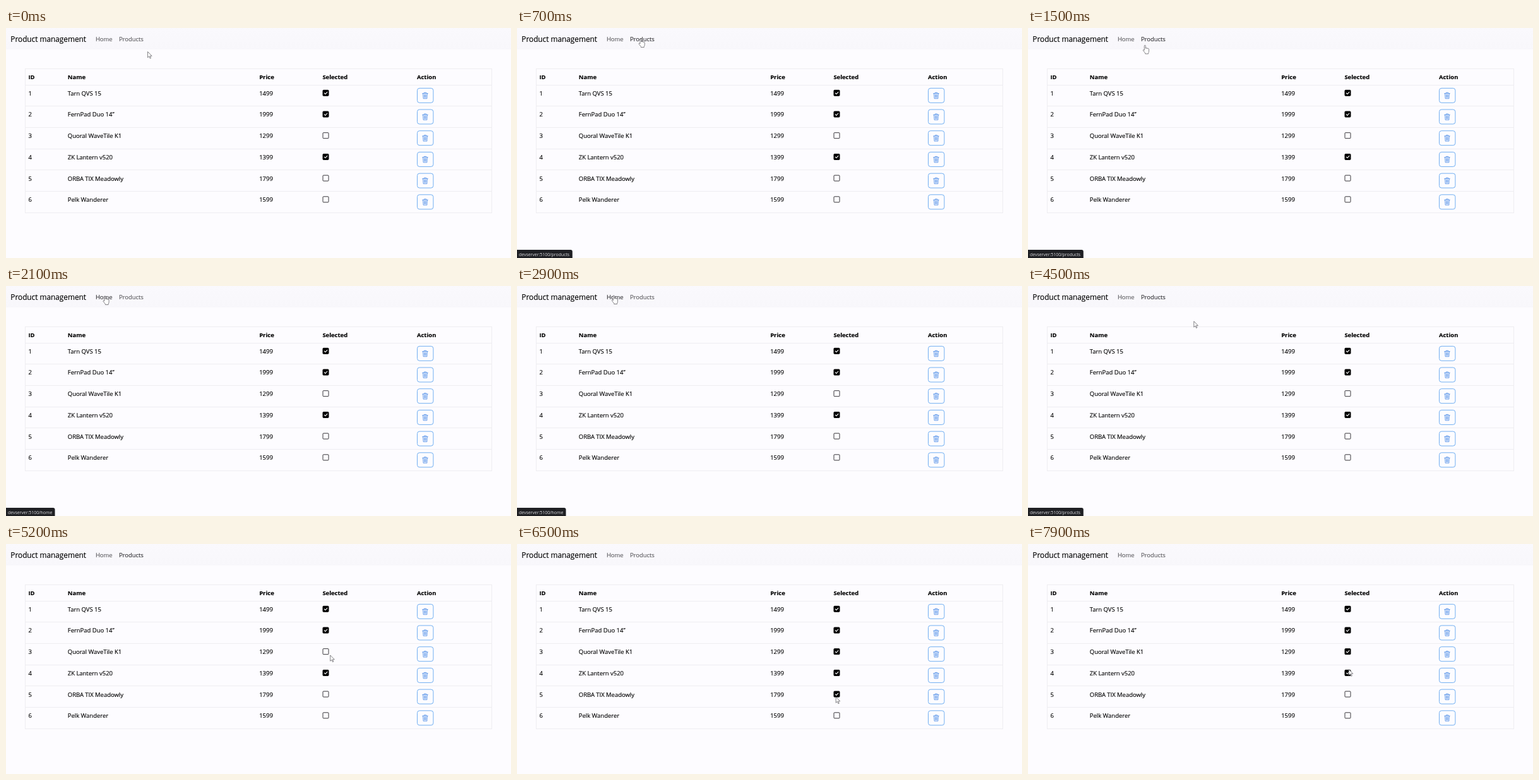
Write an HTML page that moves like this. It is 800 px wide and 364 px high and loops after 8000 ms.

```html
<!DOCTYPE html>
<html lang="en">
<head>
<meta charset="utf-8">
<title>Product management</title>
<style>
  html, body { margin: 0; height: 100%; overflow: hidden; background: #fdfcff; }
  svg { display: block; width: 100vw; height: 100vh; font: 9.45px "Open Sans", "Noto Sans", sans-serif; }
  text { fill: #000; stroke: #000; stroke-width: .15; }
  .brand { font-size: 11.82px; }
  .link { fill: #5f5e62; stroke: #5f5e62; }
  .link.dark { fill: #37363a; stroke: #37363a; }
  .head { font-weight: 700; }
  .line { fill: none; stroke: #eeedf1; shape-rendering: crispEdges; }
  .box { fill: #fdfcff; stroke: #38363a; }
  .tick { fill: none; stroke: none; stroke-width: 1.1; stroke-linecap: round; stroke-linejoin: round; }
  .on .box { fill: #000; stroke: #000; }
  .on .tick { stroke: #fff; }
  .btn { fill: none; stroke: #62a6f0; stroke-width: .9; }
  .bin { fill: none; stroke: #3f84e6; stroke-width: .75; stroke-linecap: round; }
  .status rect { fill: #1f2024; }
  .status text { font-size: 6.9px; fill: #dcdce0; stroke: none; }
  .cursor path { fill: #fff; stroke: #5c5b60; stroke-width: .75; stroke-linejoin: round; }
</style>
</head>
<body>
<svg viewBox="0 0 800 364">
  <defs>
    <linearGradient id="bar" x2="0" y2="1">
      <stop stop-color="#faf9fd"/><stop offset="1" stop-color="#f8f7fb"/>
    </linearGradient>
  </defs>
  <rect width="800" height="364" fill="#fdfcff"/>
  <rect width="800" height="34" fill="url(#bar)"/>
  <text class="brand" x="7.3" y="21.7">Product management</text>
  <text class="link" id="home" x="141.9" y="20.9">Home</text>
  <text class="link" id="products" x="178.9" y="20.9">Products</text>
  <g id="table"></g>
  <g class="status" id="status">
    <rect x="-4" y="351" height="17" rx="3"/>
    <text x="3" y="360.6"></text>
  </g>
  <g class="cursor" id="cursor">
    <path id="arrow" d="M0 0V9.3L2.2 7.3L3.7 10.7L5.1 10.1L3.6 6.8H6.6Z"/>
    <path id="hand" d="M-1 8V1A1 1 0 0 1 1 1V5Q1.1 4 2 4.2Q2.8 4.3 2.8 5.2Q3.1 4.3 4 4.6Q4.6 4.8 4.6 5.6Q5 4.9 5.7 5.3Q6.2 5.6 6.2 6.4V9.4Q6.2 11.3 5.2 12.2V13.6H.4V12.4L-2.8 8.5Q-3.4 7.4-2.4 7.1Q-1.8 7-1 8Z"/>
  </g>
</svg>
<script>
const LOOP = 8000, STEP = 100, PITCH = 33.7;
const $ = id => document.getElementById(id);

const items = [
  ["Tarn QVS 15", 1499], ["FernPad Duo 14”", 1999], ["Quoral WaveTile K1", 1299],
  ["ZK Lantern v520", 1399], ["ORBA TIX Meadowly", 1799], ["Pelk Wanderer", 1599]
];
const columns = [35.4, 97.8, 401.2, 501.4, 651];
const cells = (values, y) => values.map((v, i) => `<text x="${columns[i]}" y="${y}">${v}</text>`).join("");

const row = ([name, price], i) => `<g transform="translate(0 ${i * PITCH})">
  ${cells([i + 1, name, price], 106.8)}
  <g class="check">
    <rect class="box" x="502" y="98.3" width="9" height="9" rx="1"/>
    <path class="tick" d="M504.3 103l1.6 1.6 3-3.3"/>
  </g>
  <rect class="btn" x="651.5" y="95.3" width="25.4" height="23" rx="3.6"/>
  <path class="bin" d="M659.7 103.6H668.3M662.3 103.4V102.2H665.7V103.4M660.5 103.8L661.1 111.7H666.9L667.5 103.8M662.5 105.3L662.7 110M664 105.3V110M665.5 105.3L665.3 110"/>
</g>`;

const lines = items.map((_, i) => `M30 ${Math.floor(90 + i * PITCH) + .5}H770`).join("");
$("table").innerHTML = `<path class="line" d="M30.5 64.5H769.5V292.5H30.5Z${lines}"/>
  <g class="head">${cells(["ID", "Name", "Price", "Selected", "Action"], 81.2)}</g>
  ${items.map(row).join("")}`;
const checks = document.querySelectorAll(".check");

// Pointer path: time, x, y
const path = [
  [0, 224.5, 37.5], [300, 216, 30], [700, 196, 17], [1100, 190, 20], [1500, 185.3, 27.3],
  [2000, 157, 16], [2900, 153.3, 15], [3100, 153.3, 15], [3500, 193, 16.5], [3800, 195.6, 16.7],
  [4200, 195.6, 16.7], [4800, 330, 95], [5200, 513.7, 176], [5500, 506, 171], [5700, 506, 171],
  [6200, 505.2, 240], [6500, 505.2, 242], [7200, 505.2, 240], [7900, 508.2, 198.5]
];

function pointer(t) {
  const i = path.findIndex(p => p[0] > t);
  if (i < 0) return path.at(-1).slice(1);
  const [t0, x0, y0] = path[i - 1], [t1, x1, y1] = path[i];
  const u = (t - t0) / (t1 - t0), e = u * u * (3 - 2 * u);
  return [x0 + (x1 - x0) * e, y0 + (y1 - y0) * e];
}

const within = (t, a, b) => t >= a && t < b;
const show = (el, on) => el.style.display = on ? "" : "none";

function draw(t) {
  const [x, y] = pointer(t);
  const onHome = within(t, 1800, 3300);
  const onProducts = within(t, 500, 1700) || within(t, 3300, 4400);
  const hover = onHome || onProducts;

  $("cursor").setAttribute("transform", `translate(${x} ${y})`);
  show($("hand"), hover);
  show($("arrow"), !hover);
  $("home").classList.toggle("dark", onHome);
  $("products").classList.toggle("dark", onProducts || within(t, 4000, 5600));

  const home = within(t, 1700, 3300);
  show($("status"), within(t, 600, 4800));
  $("status").children[0].setAttribute("width", home ? 81.5 : 91.8);
  $("status").children[1].textContent = "devserver:5100/" + (home ? "home" : "products");

  show($("table"), !within(t, 3100, 4000));
  const selected = [true, true, t >= 5600, true, within(t, 6300, 7100), false];
  checks.forEach((c, i) => c.classList.toggle("on", selected[i]));
}

function tick(now) {
  draw(Math.floor(now % LOOP / STEP) * STEP);
  requestAnimationFrame(tick);
}
draw(0);
requestAnimationFrame(tick);
</script>
</body>
</html>
```
